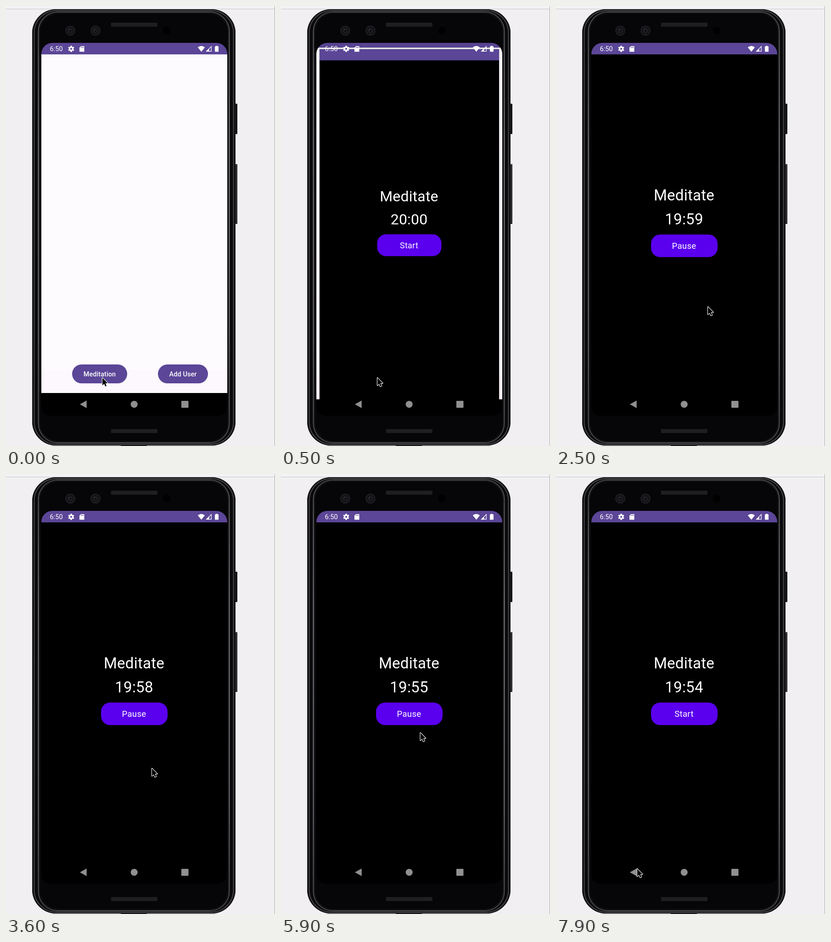
Animation of 586x955 px, one loop 8 s. Source, as an HTML page with a canvas:

```html
<!DOCTYPE html>
<html lang="en">
<head>
<meta charset="utf-8">
<title>Meditation timer</title>
<style>
  html, body { margin: 0; width: 100%; height: 100%; overflow: hidden; background: #f1eff2; }
  canvas { display: block; width: 586px; height: 955px; }
</style>
</head>
<body>
<canvas id="stage" width="586" height="955"></canvas>
<script>
const ctx = document.getElementById('stage').getContext('2d');
const LOOP = 8000, STEP = 100;
const PURPLE = '#5b4697', VIOLET = '#5a00ee', PAPER = '#fdfbfe';
const SCREEN = { x: 77, y: 80, w: 405, h: 809 };
const MID = { x: 279.5, y: 484.5 };
const OPEN_AT = 400, OPEN_MS = 400;
const START_AT = 1700, PAUSE_AT = 6900;

const clamp = v => Math.max(0, Math.min(1, v));
const lerp = (a, b, u) => a + (b - a) * u;
const smooth = u => u * u * (3 - 2 * u);
const cubic = (a, b, c, d, s) => {
  const r = 1 - s;
  return r * r * r * a + 3 * r * r * s * b + 3 * r * s * s * c + s * s * s * d;
};

// Fast start, very slow settle: two joined cubic curves.
function emphasized(x) {
  if (x <= 0) return 0;
  if (x >= 1) return 1;
  const [px, py] = x < 1 / 6
    ? [[0, .05, .1333, 1 / 6], [0, 0, .06, .4]]
    : [[1 / 6, .2083, .25, 1], [.4, .82, 1, 1]];
  let lo = 0, hi = 1;
  for (let i = 0; i < 24; i++) {
    const s = (lo + hi) / 2;
    if (cubic(...px, s) < x) lo = s; else hi = s;
  }
  return cubic(...py, lo);
}

function rect(x, y, w, h, color) {
  ctx.fillStyle = color;
  ctx.fillRect(x, y, w, h);
}
function roundPath(x, y, w, h, r) {
  ctx.beginPath();
  ctx.roundRect(x, y, w, h, r);
}
function round(x, y, w, h, r, color) {
  roundPath(x, y, w, h, r);
  ctx.fillStyle = color;
  ctx.fill();
}
function disc(x, y, r, color) {
  ctx.beginPath();
  ctx.arc(x, y, r, 0, Math.PI * 2);
  ctx.fillStyle = color;
  ctx.fill();
}
function poly(points, color) {
  ctx.beginPath();
  points.forEach(([x, y]) => ctx.lineTo(x, y));
  ctx.closePath();
  if (color) {
    ctx.fillStyle = color;
    ctx.fill();
  }
}
function text(str, x, y, size, { weight = 400, spacing = 0, align = 'center' } = {}) {
  ctx.font = `${weight} ${size}px Roboto, sans-serif`;
  ctx.letterSpacing = spacing + 'px';
  ctx.textAlign = align;
  ctx.fillStyle = '#fff';
  ctx.fillText(str, x, y);
}
function scaled(k, draw) {
  ctx.save();
  ctx.translate(MID.x, MID.y);
  ctx.scale(k, k);
  ctx.translate(-MID.x, -MID.y);
  draw();
  ctx.restore();
}

// A line along the case, dx from its sides and dy from its ends.
function ring(dx, dy, width, color) {
  roundPath(57 + dx, 7 + dy, 443 - 2 * dx, 947 - 2 * dy, 52 - (dx + dy) / 2);
  ctx.lineWidth = width;
  ctx.strokeStyle = color;
  ctx.stroke();
}

function grille(y) {
  round(228.5, y, 101.5, 9, 1.5, '#1a191b');
  for (let x = 230; x < 329; x += 2) rect(x, y + 1, 1, 7, '#242325');
}

function lens(x) {
  disc(x, 53.5, 11, '#1d1c1f');
  disc(x, 53.5, 8.5, '#131315');
  disc(x, 53.5, 5, '#202126');
  disc(x, 53.5, 2.5, '#0c0c10');
  disc(x - 2, 51.5, 1.2, '#3b3c44');
}

function phone() {
  rect(0, 0, 586, 955, '#f1eff2');
  rect(0, 0, 586, 6, '#f3f2f5');
  rect(0, 6, 586, 1, '#c6c5c9');
  rect(585, 0, 1, 955, '#aaa9ad');

  round(498, 212, 6, 66, 1.5, '#151517');
  round(498, 343, 6, 130, 1.5, '#1b1b1d');
  rect(501.5, 345, 1, 126, '#57565a');
  rect(500, 343, 4, 1.5, '#58575b');
  rect(250, 953, 57, 2, '#2a292c');

  round(57, 7, 443, 947, 52, '#0a090b');
  ring(1, 1, 2, '#161517');
  ring(4.5, 3, 2, '#48474a');
  const side = ctx.createLinearGradient(0, 7, 0, 954);
  side.addColorStop(0, '#4a494c');
  side.addColorStop(.1, '#6a696d');
  side.addColorStop(.3, '#8a898d');
  side.addColorStop(.75, '#7c7b7f');
  side.addColorStop(1, '#4a494c');
  ring(13.5, 6, 1.8, side);
  ring(16, 8, 2, '#141316');
  round(74, 17, 409, 927, 42, '#060507');

  grille(36);
  grille(918);
  lens(140);
  lens(195);
  disc(350, 53.5, 8, '#000');
}

function pill(x, w, label) {
  round(x, 778, w, 41, 20.5, PURPLE);
  text(label, x + w / 2, 804, 14.4, { weight: 500, spacing: .1 });
}

function home(t) {
  rect(77, 80, 405, 25, PURPLE);
  rect(77, 105, 405, 735, PAPER);
  rect(77, 790, 405, 50, '#fdf8fd');
  rect(77, 840, 405, 49, '#000');
  pill(144, 120, 'Meditation');
  pill(331, 109, 'Add User');
  ripple(t, 200, 211, 809, [144, 778, 120, 41, 20.5]);
}

// A press grows from the finger toward the button's middle, then fades.
function ripple(t, start, px, py, box) {
  const age = t - start;
  if (age < 0 || age > 400) return;
  const [x, y, w, h] = box;
  ctx.save();
  roundPath(...box);
  ctx.clip();
  ctx.globalAlpha = 1 - clamp((age - 220) / 180);
  const spot = (u, color) => disc(
    lerp(px, x + w / 2, clamp(u)), lerp(py, y + h / 2, clamp(u)), 32 + 60 * u, color);
  const u = age / 400;
  spot(u + .15, 'rgba(255,255,255,.07)');
  spot(u, 'rgba(255,255,255,.14)');
  ctx.restore();
}

function clock(t) {
  const gone = t < START_AT ? 0 : 1 + Math.floor((Math.min(t, PAUSE_AT) - START_AT) / 1000);
  const left = 1200 - gone;
  return Math.floor(left / 60) + ':' + String(left % 60).padStart(2, '0');
}

function timer(t) {
  rect(77, 80, 405, 809, '#000');
  rect(77, 80, 405, 25, PURPLE);
  text('Meditate', 279, 422, 33, { spacing: .25 });
  text(clock(t), 279, 474, 33, { spacing: .25 });
  const box = [207, 496, 145, 49, 20];
  round(...box, VIOLET);
  ripple(t, 1408, 301, 541, box);
  ripple(t, 6640, 297, 527, box);
  const running = t >= START_AT && t < PAUSE_AT;
  text(running ? 'Pause' : 'Start', 279, 527, 18.6, { spacing: .3 });
}

function statusIcons() {
  text('6:50', 95.5, 98, 14.6, { align: 'left' });

  ctx.save();
  ctx.translate(142, 93);
  ctx.fillStyle = '#fff';
  for (let i = 0; i < 6; i++) {
    ctx.rotate(Math.PI / 3);
    ctx.fillRect(-1.7, -6.7, 3.4, 4);
  }
  ctx.beginPath();
  ctx.arc(0, 0, 5, 0, 7);
  ctx.fill();
  disc(0, 0, 2.1, PURPLE);
  ctx.restore();

  poly([[163.5, 87], [170.5, 87], [170.5, 99.3], [160, 99.3], [160, 90.5]], '#fff');
  [163.4, 165.6, 167.8].forEach(x => rect(x, 88.5, 1.1, 2.6, PURPLE));

  ctx.beginPath();
  ctx.moveTo(425.5, 99.3);
  ctx.lineTo(417.8, 89.8);
  ctx.quadraticCurveTo(425.5, 83.6, 433.2, 89.8);
  ctx.closePath();
  ctx.fillStyle = '#fff';
  ctx.fill();

  poly([[447.2, 87.8], [447.2, 98.4], [436.6, 98.4]]);
  ctx.lineWidth = 1.3;
  ctx.strokeStyle = '#fff';
  ctx.stroke();
  poly([[442.5, 92.5], [442.5, 98.4], [436.6, 98.4]], '#fff');

  rect(457.2, 86.5, 3.6, 2, '#fff');
  round(455, 87.6, 8, 11.7, 1, '#fff');
}

function navIcons() {
  poly([[161, 864.5], [175.7, 856.3], [175.7, 872.7]], '#909090');
  disc(279.2, 864.5, 7.6, '#909090');
  round(382, 857, 15.5, 15, 1, '#909090');
}

const PATH = [
  [0, 210, 807], [600, 210, 807], [900, 245, 614], [1300, 299, 532],
  [1900, 299, 532], [2400, 331, 653], [2800, 331, 653], [3300, 318, 639],
  [5400, 318, 639], [6200, 297, 526], [7200, 297, 526], [7800, 177, 857], [8000, 177, 857]
];
const ARROW = [[0, 0], [0, 16.4], [3.8, 12.9], [6.4, 18.8], [9.1, 17.6], [6.5, 11.8], [11.5, 11.8]];

function cursor(t) {
  const i = PATH.findIndex(p => p[0] > t);
  const [t0, x0, y0] = PATH[i - 1], [t1, x1, y1] = PATH[i];
  const u = smooth((t - t0) / (t1 - t0));
  ctx.save();
  ctx.translate(lerp(x0, x1, u), lerp(y0, y1, u));
  poly(ARROW);
  ctx.lineJoin = 'round';
  ctx.lineWidth = 2.2;
  ctx.strokeStyle = '#fff';
  ctx.stroke();
  ctx.fillStyle = '#000';
  ctx.fill();
  ctx.restore();
}

function draw(t) {
  phone();
  const p = emphasized((t - OPEN_AT) / OPEN_MS);
  ctx.save();
  roundPath(SCREEN.x, SCREEN.y, SCREEN.w, SCREEN.h, [24, 24, 20, 20]);
  ctx.clip();
  if (p < 1) {
    scaled(lerp(1, 1.05, p), () => home(t));
    if (p > 0) rect(77, 80, 405, 809, 'rgba(0,0,0,.04)');
  }
  if (p > 0) scaled(lerp(.85, 1, p), () => timer(t));
  statusIcons();
  navIcons();
  ctx.restore();
  cursor(t);
}

const begin = performance.now();
function frame() {
  const t = (performance.now() - begin) % LOOP;
  draw(Math.floor(t / STEP) * STEP);
  requestAnimationFrame(frame);
}
frame();
</script>
</body>
</html>
```
